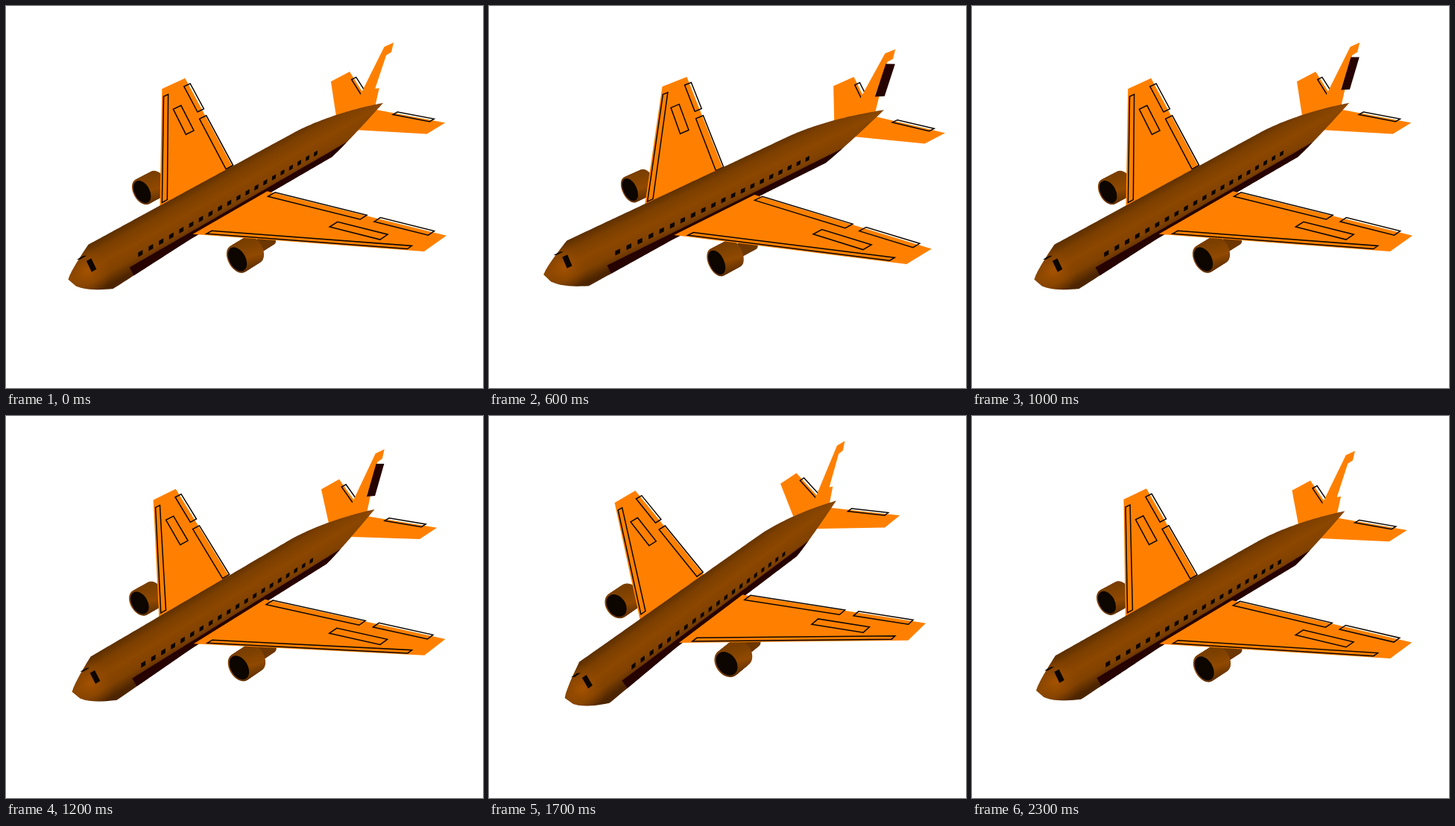
An HTML page with a canvas that plays this animation: 640 by 512 pixels, repeating every 2400 ms.

```html
<!DOCTYPE html>
<html lang="en">
<head>
<meta charset="utf-8">
<title>Yawing airliner</title>
<style>
html, body { margin: 0; width: 100%; height: 100%; overflow: hidden; background: #fff; }
canvas { display: block; width: 640px; height: 512px; }
</style>
</head>
<body>
<canvas id="stage" width="640" height="512"></canvas>
<script>
const ctx = document.getElementById('stage').getContext('2d');
const LOOP = 2400, STEP = 100, STEPS = LOOP / STEP, PEAK = 5;
const ORANGE = '#ff8000', DARK = '#260200', INK = '#0c0500';

// Model space: x runs from nose to tail, y to the near wing tip, z up; the yaw pivot is 0.
const NOSE = -195, TAIL_END = 455, PIVOT = [232.5, 283];

// Lifting surfaces: edges run from root to tip. Panels: edge, span from-to, offset from-to.
const WING = {
  span: [31, 246], lead: [-6, 210], trail: [143, 262], z: -5.5,
  panels: [
    ['lead', .05, .92, 4, 14], ['trail', .04, .56, -13, 2],
    ['trail', .63, .925, -10, 4], ['trail', .485, .76, -50, -33]
  ]
};
const STABILIZER = {
  span: [24, 92], lead: [367, 440], trail: [445, 489], z: -1.5,
  panels: [['trail', .06, .75, -6, 6]]
};
// Side views as x, z.
const FIN = [[371, 14], [440, 102], [464, 101], [461, 86], [448, 85], [428, 35], [439, 32], [433, 0]];
const RUDDER = [[445, 83], [468, 75], [452, 25], [428, 33]];

const lerp = (a, b, t) => a + (b - a) * t;
const clamp = v => Math.min(1, Math.max(0, v));

let cam;

// The axes swing with the turn: 0 is nose-right, 1 is nose-left.
function aim(turn) {
  const swing = (a, b) => lerp(a, b, turn);
  const along = [swing(.614, .76), swing(-.446, -.367)];
  const size = Math.hypot(...along);
  cam = {
    along,
    across: [swing(.83, .649), swing(.435, .544)],
    normal: [-along[1] / size, along[0] / size],
    angle: Math.atan2(along[1], along[0]),
    depth: [swing(.000434, .000357), swing(.000338, .000418)],
    open: swing(.74, .56)
  };
}

const scale = (x, y, z) => 1 / (1 + cam.depth[0] * x - cam.depth[1] * y - .000377 * z);

function project(x, y, z) {
  const k = scale(x, y, z), { along, across } = cam;
  return [
    PIVOT[0] + k * (along[0] * x + across[0] * y),
    PIVOT[1] + k * (along[1] * x + across[1] * y - .825 * z)
  ];
}

// A point on the fuselage picture, n below its axis.
function hull(x, n) {
  const [px, py] = project(x, 0, 0), k = scale(x, 0, 0);
  return [px + cam.normal[0] * n * k, py + cam.normal[1] * n * k];
}

function trace(points) {
  ctx.beginPath();
  points.forEach(p => ctx.lineTo(...p));
  ctx.closePath();
}

function fill(points, color) {
  trace(points);
  ctx.fillStyle = color;
  ctx.fill();
}

function outline(points) {
  trace(points);
  ctx.strokeStyle = INK;
  ctx.lineWidth = 1.5;
  ctx.stroke();
}

function surface(part, side, root) {
  const spot = (edge, t, off) =>
    project(lerp(...part[edge], t) + off, side * lerp(...part.span, t), part.z);
  fill([spot('lead', root, 0), spot('lead', 1, 0), spot('trail', 1, 0), spot('trail', root, 0)], ORANGE);
  part.panels.forEach(([edge, t0, t1, o0, o1]) =>
    outline([spot(edge, t0, o0), spot(edge, t1, o0), spot(edge, t1, o1), spot(edge, t0, o1)]));
}

function disc(x, y, z, r, color) {
  const k = scale(x, y, z);
  ctx.beginPath();
  ctx.ellipse(...project(x, y, z), r * k * cam.open, r * k, cam.angle, 0, Math.PI * 2);
  ctx.fillStyle = color;
  ctx.fill();
}

function engine(side) {
  const front = 17, back = 48, y = side * 90, z = -20, r = 19.5;
  const [px, py] = project(front, y, z);
  const shade = ctx.createLinearGradient(px, py - r, px + r * .6, py + r);
  shade.addColorStop(0, '#7a3f00');
  shade.addColorStop(.5, '#904900');
  shade.addColorStop(1, '#542a00');
  for (let x = back + 36; x > back; x--) disc(x, y, z, 9, '#6e3800');
  for (let x = back; x >= front; x--) disc(x, y, z, r, shade);
  disc(front, y, z, r - 2.5, INK);
}

const noseCap = x => clamp((x - NOSE) / 50);
const taper = (x, from, power) => 1 - clamp((x - from) / (TAIL_END - from)) ** power;
const above = x => 26 * noseCap(x) ** .85 * taper(x, 260, 1.7);
const below = x => (33 + 5 * clamp(-x / 140)) * noseCap(x) ** .5 * taper(x, 300, 1.1);

// The strip of hull between two heights over a stretch of x.
function strip(from, to, top, bottom) {
  const upper = [], lower = [];
  for (let i = 0; i <= 130; i++) {
    const x = lerp(from, to, i / 130);
    upper.push(hull(x, top(x)));
    lower.unshift(hull(x, bottom(x)));
  }
  return upper.concat(lower);
}

function fuselage() {
  const body = strip(NOSE, TAIL_END, x => -above(x), below);
  const shade = ctx.createLinearGradient(...hull(0, -27), ...hull(0, 34));
  [[0, '#5c2f00'], [.2, '#7c3f00'], [.48, '#8c4700'], [.75, '#804100'], [1, '#4c2500']]
    .forEach(stop => shade.addColorStop(...stop));
  fill(body, shade);

  const [x, y] = hull(-165, 3);
  const glow = ctx.createRadialGradient(x, y, 2, x, y, 32);
  glow.addColorStop(0, 'rgba(166,83,0,.85)');
  glow.addColorStop(1, 'rgba(140,70,0,0)');
  fill(body, glow);

  fill(strip(-108, 400, x => Math.min(25, below(x)), below), DARK);
}

// A pane spans x0 to x1 between two y, z rails.
function pane(x0, x1, a, b) {
  fill([project(x0, ...a), project(x1, ...a), project(x1, ...b), project(x0, ...b)], INK);
}

function glass() {
  pane(-170, -162, [7, 20], [16, 9]);
  pane(-173, -162, [-8, 14], [-2, 18]);
  for (let i = 0; i < 20; i++) {
    const x = lerp(-101, 248, i / 19);
    pane(x - 4, x + 4, [31, 15], [31, 8]);
  }
}

function draw(step) {
  const gap = Math.abs(step - PEAK), away = Math.min(gap, STEPS - gap);
  aim((12 - away) / 11);
  ctx.fillStyle = '#fff';
  ctx.fillRect(0, 0, 640, 512);

  const sideView = points => points.map(([x, z]) => project(x, 0, z));
  engine(-1);
  surface(WING, -1, 0);
  surface(STABILIZER, -1, -.3);
  fill(sideView(FIN), ORANGE);
  if (step > PEAK && step < PEAK + 12) fill(sideView(RUDDER), DARK);
  surface(STABILIZER, 1, -.3);
  engine(1);
  fuselage();
  glass();
  surface(WING, 1, 0);
}

const start = performance.now();
function tick() {
  const t = (performance.now() - start) % LOOP;
  draw(Math.floor(t / STEP));
  requestAnimationFrame(tick);
}
tick();
</script>
</body>
</html>
```
